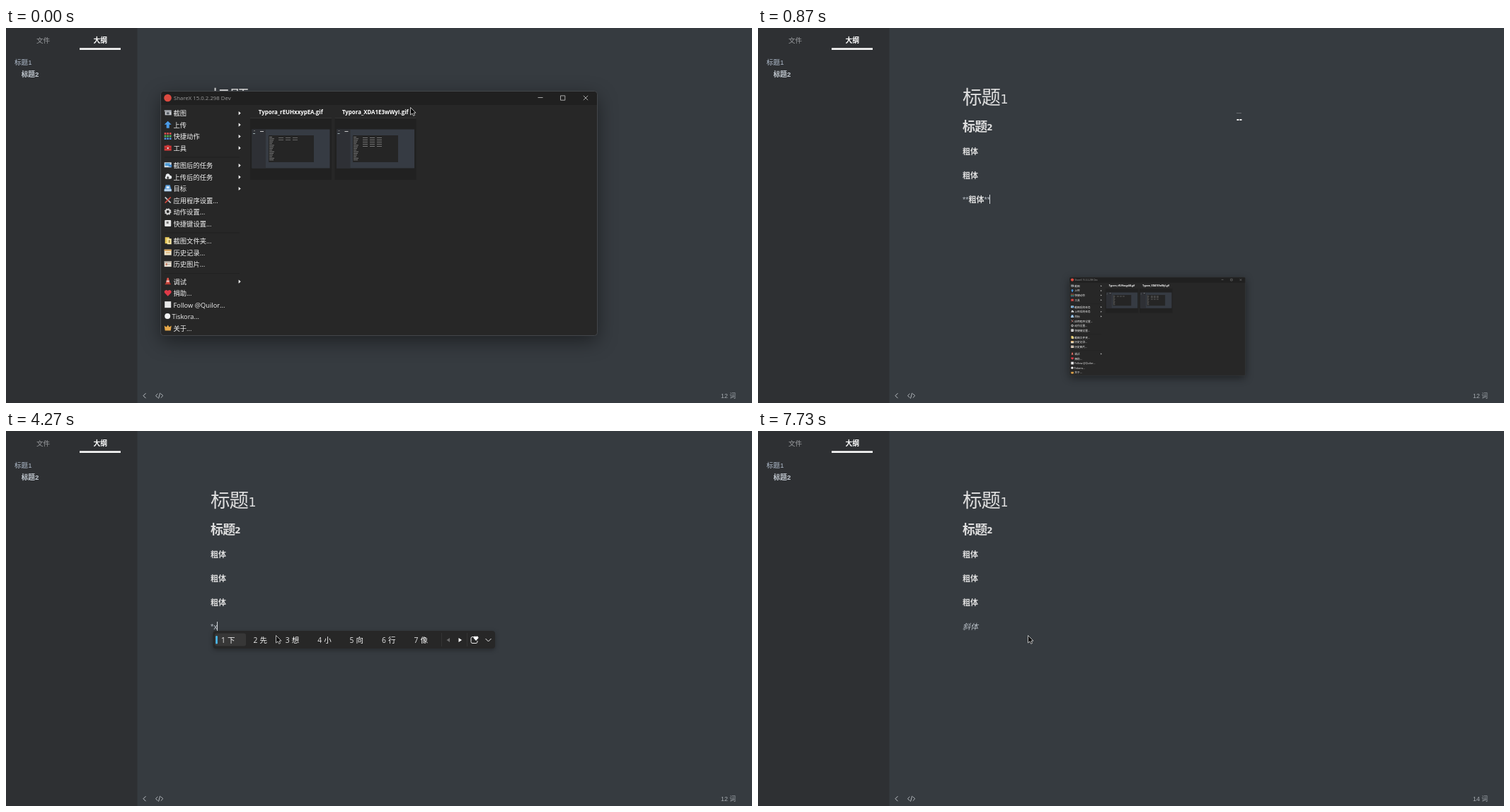
Recreate the animation shown at these times as an HTML page. Size 1054 by 531 pixels, loop 8 s.

```html
<!DOCTYPE html>
<html lang="zh">
<head>
<meta charset="utf-8">
<style>
html, body { margin: 0; width: 100%; height: 100%; overflow: hidden; background: #363b40; }
svg { display: block; width: 1054px; height: 531px; }
text { font-family: "Liberation Sans", "Noto Sans CJK SC", sans-serif; white-space: pre; }
#win text, #ime text { font-family: "Open Sans", "Noto Sans CJK SC", sans-serif; }
.shadow { filter: drop-shadow(0 8px 14px rgba(0,0,0,.45)); }
.line { fill: none; stroke-width: 1; }
.b { font-weight: 700; }
.mark { font-weight: 400; fill: #b8bfc6; }
.it { font-style: italic; }
</style>
</head>
<body>
<svg id="stage" viewBox="0 0 1054 531"></svg>
<script>
const rect = (x, y, w, h, fill, more = '') =>
  `<rect x="${x}" y="${y}" width="${w}" height="${h}" fill="${fill}" ${more}/>`;
const text = (x, y, size, fill, str, more = '') =>
  `<text x="${x}" y="${y}" font-size="${size}" fill="${fill}" ${more}>${str}</text>`;
const path = (d, fill) => `<path d="${d}" fill="${fill}"/>`;
const line = (d, color, more = '') => `<path class="line" d="${d}" stroke="${color}" ${more}/>`;
const dot = (x, y, r, fill) => `<circle cx="${x}" cy="${y}" r="${r}" fill="${fill}"/>`;
const at = (x, y, body, more = '') => `<g transform="translate(${x} ${y})" ${more}>${body}</g>`;
const range = n => [...Array(n).keys()];

function editor() {
  const row = (i, more = '') => text(289, 179 + 34 * i, 11, '#dedede', '粗体', 'class="b" ' + more);
  return rect(0, 0, 1054, 531, '#363b40') + rect(0, 0, 185.5, 531, '#2e3033')
    + text(43, 20.8, 9.6, '#9a9c9f', '文件')
    + text(123.5, 20.8, 9.8, '#fff', '大纲', 'class="b"')
    + rect(104, 28.3, 58, 2.6, '#fff')
    + text(12, 51.6, 9.6, '#b0bccc', '标题1')
    + text(21.7, 68.8, 9.7, '#c3cad2', '标题2', 'class="b"')
    + text(289, 107.5, 27.5, '#dedede', '标题', 'letter-spacing="-1"')
    + text(342.5, 107, 17.4, '#dedede', '1', 'style="font-family:DejaVu Sans,sans-serif"')
    + text(289, 145.6, 17.9, '#dedede', '标题', 'class="b" letter-spacing="-.7"')
    + text(323.3, 145.2, 12, '#dedede', '2', 'class="b" style="font-family:DejaVu Sans,sans-serif"')
    + row(0) + row(1) + row(2, 'id="bold"')
    + text(289, 281, 11, '#b8bfc6', '', 'id="last"')
    + rect(289, 236, 1, 13, '#d5d9dd', 'id="caret"')
    + line('M197.5 517.2L194 520.7L197.5 524.2', '#c0c4c8', 'stroke-width="1.3"')
    + line('M214.5 517.8L211.5 520.7L214.5 523.6M218.8 517.8L221.8 520.7L218.8 523.6M217.8 516.8L215.5 524.6', '#b4b9be')
    + text(1010, 524, 8.8, '#a4a9ae', '', 'id="count"');
}

// Icons are drawn around their own centre, about 10 px wide.
const card = (fill, ink) => rect(-5, -4, 10, 8, fill) + rect(-5, -4, 10, 2, ink) + rect(-3, 0, 6, 1, ink);
const icons = [
  rect(-5, -4, 10, 2, '#a4a9b0') + rect(-4, -2, 9, 5, '#c9ccd0') + rect(-2, -1, 4, 3, '#555b63'),
  path('M0-5L5 0H2V5H-2V0H-5Z', '#4a9be8'),
  range(9).map(i => rect(i % 3 * 3.6 - 5, (i / 3 | 0) * 3.6 - 5, 2.6, 2.6, ['#e05252', '#58b85c', '#4f8fe0'][i / 3 | 0])).join(''),
  rect(-2, -4, 4, 2, '#a33') + rect(-5, -3, 10, 7, '#d33a3a') + rect(-5, 0, 10, 1, '#7c1f1f') + rect(-1, -.5, 2, 2, '#eee'),
  rect(-5, -4, 10, 7, '#dce6ee') + rect(-4, -3, 7, 4, '#4b9ad6') + path('M1 0H4V-2L6 1L4 4V2H1Z', '#2f78c2'),
  path('M-3 3A2.5 2.5 0 0 1-3-1A3 3 0 0 1 3-2A2.5 2.5 0 0 1 3 3Z', '#e8ebee') + path('M0-1L2 1.5H1V4H-1V1.5H-2Z', '#444'),
  path('M-3-5H3L5 2V4H-5V2Z', '#5b9cd8') + rect(-5, 1, 10, 3, '#b9d3ea') + rect(-2, -3, 4, 3, '#e5eef6'),
  line('M-4-4L4 4', '#c6cacf', 'style="stroke-width:1.7"') + line('M4-4L-4 4', '#d0483c', 'style="stroke-width:1.7"'),
  `<circle r="3" fill="none" stroke="#d4d4d4" stroke-width="2"/><circle r="4.2" fill="none" stroke="#d4d4d4" stroke-width="1.2" stroke-dasharray="1.7 1.6"/>`,
  rect(-4.5, -4.5, 9, 9, '#e6e6e6', 'rx="1"') + rect(-2, -2.5, 3, 3, '#777'),
  path('M-4-5H2V4H-4Z', '#e9c95a') + path('M-1-3H5V5H-1Z', '#f5e6a8') + rect(1, -1, 2, 4, '#a88a3a'),
  card('#f0e6cc', '#d59a4a'),
  card('#e6dfd2', '#a8a096') + rect(-3, -1, 2, 3, '#c7745a'),
  path('M-1-5H1L3 3H-3Z', '#e2574c') + rect(-2, -1, 4, 1.5, '#f3e6e4') + rect(-4, 3, 8, 1.5, '#b83a32'),
  path('M0 4.5L-4.4 0A2.5 2.5 0 0 1 0-3A2.5 2.5 0 0 1 4.4 0Z', '#e03a48'),
  rect(-4.5, -4.5, 9, 9, '#e8e8e8'),
  dot(-.5, 0, 4, '#f2f2f2'),
  path('M-5-3L-2-1L0-4L2-1L5-3L4 4H-4Z', '#e8a94a')
];
const labels = ['截图', '上传', '快捷动作', '工具', '截图后的任务', '上传后的任务', '目标', '应用程序设置...',
  '动作设置...', '快捷键设置...', '截图文件夹...', '历史记录...', '历史图片...', '调试', '捐助...',
  'Follow @Quilor...', 'Tiskora...', '关于...'];

function menu() {
  return labels.map((label, i) => {
    const gaps = (i > 3) + (i > 9) + (i > 12), y = 121 + 16.45 * i + 8.2 * gaps;
    return at(228.7, y - .7, icons[i])
      + text(i == 16 ? 234.5 : 236.5, y + 3.4, 9.3, '#f2f2f2', label)
      + (i < 7 || i == 13 ? path(`M328.7 ${y - 3}L331.7 ${y - .4}L328.7 ${y + 2.2}Z`, '#fff') : '');
  }).join('') + [182.5, 289.5, 347].map(y => rect(224, y, 106, 1, '#212121')).join('');
}

function thumb(x, name, winX, lines) {
  return text(x + 57.3, 122.3, 7.9, '#fff', name, 'class="b" text-anchor="middle"')
    + rect(x, 127, 115, 88, '#212121') + rect(x, 127, 115, 1, '#333')
    + rect(x + 2.5, 143.5, 110, 55, '#363b43') + rect(x + 2.5, 143.5, 19.5, 55, '#2e3035')
    + rect(x + 14, 146, 5, 1, '#ccc') + rect(x + 5, 145, 2, 1, '#777') + rect(x + 4, 149, 3, 1, '#9aa')
    + rect(winX, 152, 64, 38, '#252525')
    + range(15).map(i => rect(winX + 1, 154 + i * 2.3, 4 + i * 3 % 4, 1, '#777')).join('')
    + range(lines * 3).map(i => rect(winX + 14 + i % 3 * 10, 155 + (i / 3 | 0) * 3, 7, 1, lines > 2 ? '#777' : '#666')).join('');
}

function appWindow() {
  return rect(218.5, 89.5, 617, 346, '#272727', 'rx="4" class="shadow"')
    + path('M218.5 109V93.5Q218.5 89.5 222.5 89.5H831.5Q835.5 89.5 835.5 93.5V109Z', '#202020')
    + rect(218.5, 89.5, 617, 346, 'none', 'rx="4" stroke="#43464a"')
    + dot(228.5, 99, 5.3, '#dc4a40')
    + text(237, 102, 7.8, '#9c9c9c', 'ShareX 15.0.2.298 Dev')
    + line('M751.5 98.5H758.5M783.5 95.9H789.8V102.2H783.5ZM815.8 95.8L822.2 102.2M822.2 95.8L815.8 102.2', '#a8a8a8')
    + menu()
    + thumb(345, 'Typora_rEUHxxypEA.gif', 371, 2)
    + thumb(464.5, 'Typora_XDA1E3wWyI.gif', 490, 5);
}

function imePanel() {
  return rect(292.5, 283, 398.5, 25, '#272727', 'rx="4" style="filter:drop-shadow(0 2px 3px rgba(0,0,0,.3))"')
    + rect(295, 286.5, 44, 18, '#373737', 'rx="3"') + rect(296.3, 290, 2.5, 11.5, '#4cc2ff', 'rx="1.2"')
    + range(7).map(i => text(304 + 45.4 * i, 299.8, 10.3, '#e8e8e8', i + 1)
      + text(313 + 45.4 * i, 299.8, 10.5, '#f4f4f4', '', 'class="word"')).join('')
    + rect(615, 286, 1, 19, '#343434') + rect(651, 286, 1, 19, '#343434')
    + path('M627 293L622.5 296L627 299Z', '#6c6c6c') + path('M639.5 293L644 296L639.5 299Z', '#fff')
    + line('M661.5 291.5H659Q657 291.5 657 293.5V298.5Q657 300.5 659 300.5H664Q666 300.5 666 298.5V297', '#eee', 'stroke-width="1.2"')
    + path('M664 297L660.8 293.6A1.8 1.8 0 0 1 664 291.6A1.8 1.8 0 0 1 667.2 293.6Z', '#fff')
    + line('M677.5 294L681.5 298L685.5 294', '#eee', 'stroke-width="1.2"');
}

const stage = document.getElementById('stage');
stage.innerHTML = editor() + `<g id="win">${appWindow()}</g><g id="ime">${imePanel()}</g>`
  + `<g id="arrow"><path d="M.5.5V11L3 8.8L4.7 12.3L6.5 11.4L4.9 8.1H8Z" fill="#000" stroke="#e4e4e4" stroke-width=".8"/></g>`
  + `<g id="beam">${rect(-4, -5, 7, 1, '#666a6e') + rect(-3.5, 4, 3, 2, '#f0f0f0') + rect(.5, 4, 3, 2, '#f0f0f0')}</g>`;
const [bold, last, caret, count, win, ime, arrow, beam] =
  ['bold', 'last', 'caret', 'count', 'win', 'ime', 'arrow', 'beam'].map(id => document.getElementById(id));
const words = [...document.querySelectorAll('.word')];

const mark = s => `<tspan class="mark">${s}</tspan>`;
const italic = '<tspan class="it">斜体</tspan>';

// [step, text of the last line, row of the caret or 0 when it is hidden]
const typing = [
  [0, '', 2], [20, '', 0], [22, '', 3], [29, '', 0], [37, '', 3], [45, '', 0], [53, '', 3],
  [57, '*', 3], [64, '*x', 3], [72, '*x', 0], [80, '*x', 3], [82, '*xi', 3], [83, '*xie', 3],
  [85, "*xie't", 3], [86, "*xie'ti", 3], [91, '*斜体', 3], [99, '*斜体', 0], [100, '*斜体*', 3],
  [101, mark('*') + italic + mark('*'), 3], [108, italic, 4], [116, italic, 0]
];
// [step, candidates]
const choices = [
  [0, '下 先 想 小 向 行 像'], [82, '系 西 喜 洗 习 细 戏'], [83, '写 些 谢 鞋 斜 协 歇'],
  [85, '斜体 写 些 谢 鞋 斜 协'], [86, '斜体 写 些 谢 鞋 斜 协']
];
const current = (list, k) => list.filter(e => e[0] <= k).pop();
const show = (el, on) => el.setAttribute('display', on ? 'inline' : 'none');
const move = (el, x, y) => el.setAttribute('transform', `translate(${x} ${y})`);

const shrink = [.985, .94, .827, .403];
const glide = [0, .022, .19, .45, .72, .93, 1];

function pointer(k) {
  if (k < 11) {
    const p = Math.min(k / 8, 1), u = p * p * (3 - 2 * p);
    return [571 + 179 * u, 112 * (1 - u) ** 2 + 248 * u * (1 - u) + 94 * u * u];
  }
  const g = glide[Math.min(k - 11, 6)];
  return [750 - 366 * g, 290 - 196 * (1 - g) ** .82];
}

function draw(k) {
  const s = k < 10 ? 1 : shrink[k - 10];
  show(win, s);
  if (s) win.setAttribute('transform',
    `translate(${527 + 62.5 * (1 - s)} ${262.5 + 268 * (1 - s)}) scale(${s}) translate(-527 -262.5)`);

  bold.innerHTML = k < 21 ? mark('**') + '粗体' + mark('**') : '粗体';
  const [, str, row] = current(typing, k);
  last.innerHTML = str;
  show(caret, row);
  const width = row == 2 ? bold.getComputedTextLength() : row == 3 && str ? last.getComputedTextLength() : 0;
  caret.setAttribute('x', Math.max(289, Math.floor(288.75 + width)));
  caret.setAttribute('y', row == 2 ? 236 : row == 4 ? 304.5 : 270);
  count.textContent = k < 91 ? '12 词' : '14 词';

  show(ime, k >= 64 && k < 91);
  current(choices, k)[1].split(' ').forEach((w, i) => words[i].textContent = w);

  const isBeam = k >= 10 && k < 64, [x, y] = pointer(k).map(Math.round);
  show(beam, isBeam);
  show(arrow, !isBeam);
  move(beam, x, y);
  move(arrow, k < 64 ? x : 381, k < 64 ? y : 289);
}

let shown = -1;
function tick() {
  // The picture advances 15 times a second, 120 steps per loop.
  const k = Math.floor(performance.now() % 8000 * .015 + .1) % 120;
  if (k != shown) draw(shown = k);
  requestAnimationFrame(tick);
}
tick();
</script>
</body>
</html>
```
